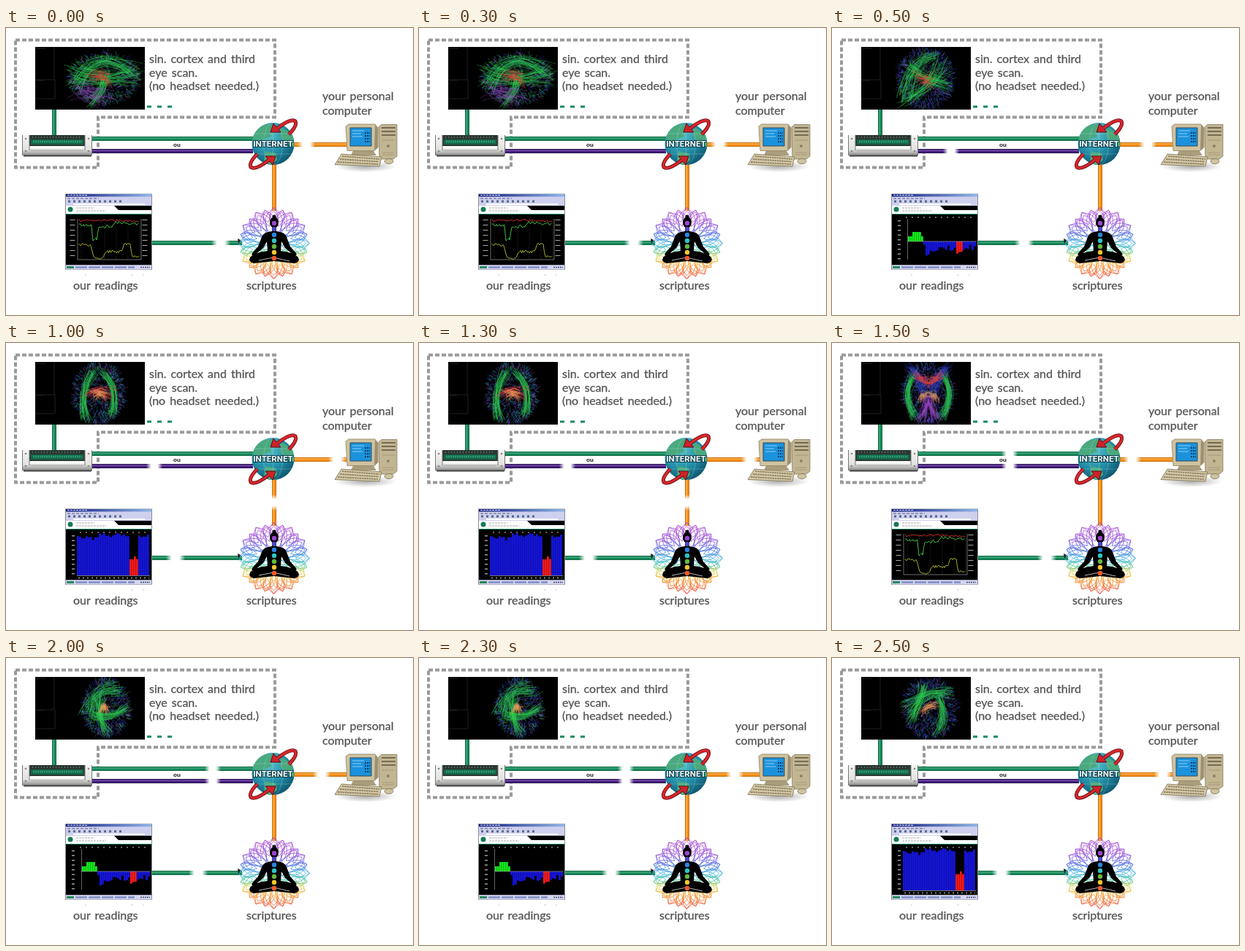
These frames come from a looping animation (557x394 px, 3 s). An HTML page:

```html
<!DOCTYPE html>
<html lang="en">
<head>
<meta charset="utf-8">
<title>Scan network</title>
<style>
html, body { margin: 0; width: 100%; height: 100%; overflow: hidden; background: #fff; }
svg { display: block; width: 557px; height: 394px; }
.label { font: 16px Lato, "Open Sans", sans-serif; word-spacing: 2px; fill: #555; stroke: #555; stroke-width: .3; }
</style>
</head>
<body>
<svg id="stage" viewBox="0 0 557 394" xmlns="http://www.w3.org/2000/svg">
<defs>
  <linearGradient id="fadeX"><stop offset="0" stop-color="#fff" stop-opacity="0"/><stop offset=".3" stop-color="#fff"/><stop offset=".7" stop-color="#fff"/><stop offset="1" stop-color="#fff" stop-opacity="0"/></linearGradient>
  <linearGradient id="fadeY" x2="0" y2="1"><stop offset="0" stop-color="#fff" stop-opacity="0"/><stop offset=".3" stop-color="#fff"/><stop offset=".7" stop-color="#fff"/><stop offset="1" stop-color="#fff" stop-opacity="0"/></linearGradient>
  <linearGradient id="petal" gradientUnits="userSpaceOnUse" x1="0" y1="-49" x2="0" y2="49">
    <stop offset="0" stop-color="#b04fcf"/><stop offset=".22" stop-color="#9a52d8"/><stop offset=".36" stop-color="#5568e0"/><stop offset=".5" stop-color="#36aee0"/><stop offset=".6" stop-color="#4cc8a0"/><stop offset=".7" stop-color="#e8cf3a"/><stop offset=".8" stop-color="#f59a2c"/><stop offset="1" stop-color="#ec3c34"/>
  </linearGradient>
  <radialGradient id="sea" cx=".38" cy=".3" r=".75"><stop offset="0" stop-color="#5cc3c8"/><stop offset=".55" stop-color="#2390aa"/><stop offset="1" stop-color="#0d536c"/></radialGradient>
  <radialGradient id="shade"><stop offset="0" stop-color="#888" stop-opacity=".7"/><stop offset="1" stop-color="#888" stop-opacity="0"/></radialGradient>
  <linearGradient id="metal" x2="0" y2="1"><stop offset="0" stop-color="#f4f4f2"/><stop offset=".7" stop-color="#e2e2e0"/><stop offset="1" stop-color="#888"/></linearGradient>
  <linearGradient id="title"><stop offset="0" stop-color="#101a80"/><stop offset="1" stop-color="#8eb6e8"/></linearGradient>
  <clipPath id="scanBox"><rect x="40" y="26" width="150" height="86"/></clipPath>
  <clipPath id="ball"><circle cx="365.500" cy="159" r="29"/></clipPath>
</defs>
<rect width="557" height="394" fill="#fff"/>
<path d="M13 16.500H368V122.500H126V191.500H13Z" fill="none" stroke="#9a9a9a" stroke-width="4" stroke-dasharray="6 3"/>
<g id="cables"></g>
<text x="229" y="163" font-family="Liberation Sans, Arial, sans-serif" font-size="8" font-weight="700" fill="#111">ou</text>
<g id="gaps"></g>

<rect x="40" y="26" width="150" height="86"/>
<path d="M40 71H67V97H40M66 26V71M42 28H54M42 72H52" fill="none" stroke="#2b2f33" stroke-width=".7"/>
<g id="scans" clip-path="url(#scanBox)" fill="none"></g>
<path d="M193 108H199M207 108H213M221 108H227" stroke="#168a5c" stroke-width="3"/>

<g id="device">
  <rect x="22.500" y="147" width="95" height="28" rx="1" fill="url(#metal)"/>
  <path d="M24 175.500H117" stroke="#444" stroke-width="2"/>
  <rect x="32" y="147" width="76" height="15" fill="#2a3631"/>
  <path d="M36 150H104" stroke="#6c7771" stroke-width="2" stroke-dasharray="1 3"/>
  <rect x="34" y="153" width="72" height="7" fill="#14664a"/>
  <path d="M37 156H104" stroke="#2f9a70" stroke-width="3" stroke-dasharray="2 1"/>
  <path d="M32 164H108" stroke="#fff" stroke-width="3"/>
  <path d="M34 168.500H106" stroke="#bdbdbb" stroke-width="3"/>
  <path d="M22.500 147V175M117.500 147V175M32 147V168M108 147V168" stroke="#777"/>
  <g fill="#888"><circle cx="27" cy="152" r="1.300"/><circle cx="27" cy="169" r="1.300"/><circle cx="113" cy="152" r="1.300"/><circle cx="113" cy="169" r="1.300"/></g>
</g>

<g id="globe">
  <circle cx="365.500" cy="159" r="29" fill="url(#sea)"/>
  <g clip-path="url(#ball)">
    <path d="M338 148Q346 131 362 132L370 139 361 144 363 149 352 153 346 163 339 160ZM355 169L369 172 371 181 361 190 353 182ZM377 136L394 147V163L383 158 375 149Z" fill="#4aa97e"/>
    <g fill="none" stroke="#b4e7e4" stroke-width=".6" opacity=".5"><ellipse cx="365.500" cy="159" rx="13" ry="29"/><path d="M336 145H395M336 173H395M365.500 130V188"/></g>
  </g>
  <g id="swoosh" stroke-linejoin="round">
    <path d="M387 146Q399 134 396 128Q390 123 371 138" fill="none" stroke="#5c0d12" stroke-width="5"/>
    <path d="M362 143L366 131 376 143Z" fill="#cf2229" stroke="#5c0d12"/>
    <path d="M387 146Q399 134 396 128Q390 123 371 138" fill="none" stroke="#d9262d" stroke-width="3.400"/>
  </g>
  <use href="#swoosh" transform="rotate(180 365.500 159.500)"/>
  <text x="365.500" y="163" text-anchor="middle" font-family="Roboto, Arial, sans-serif" font-size="11.600" font-weight="700" fill="#fff" stroke="#073c4c" stroke-width="2" paint-order="stroke">INTERNET</text>
</g>

<g id="computer" stroke-linejoin="round">
  <ellipse cx="492" cy="190" rx="42" ry="8" fill="url(#shade)"/>
  <path d="M510 136L514 132.500H535V176L530 180H511Z" fill="#c2b592" stroke="#877b5f" stroke-width=".8"/>
  <path d="M514 137H533M514 142H533M514 147H533" stroke="#766c54" stroke-width="2"/>
  <path d="M515 154H532M515 171H531M515 174H531" stroke="#a7997a"/>
  <circle cx="523" cy="162" r="2" fill="#8c8064"/>
  <path d="M476 166H501L507 175H472Z" fill="#aa9d7c"/>
  <path d="M465 135L469 132H505L509 137V164L504 168.500H467Z" fill="#cfc3a0" stroke="#8d8265" stroke-width=".8"/>
  <path d="M505 133L509 137V164L504 168Z" fill="#9d9172"/>
  <path d="M471 137H500V162H471Z" fill="#1b92dc" stroke="#344b55"/>
  <path d="M474 141H490M474 145H486M474 149H488" stroke="#8ed1f4"/>
  <path d="M491 144H498M491 148H498M491 152H498M491 156H498" stroke="#0c426f" stroke-width="2" stroke-dasharray="2 1"/>
  <path d="M459 173L514 177 511 190 450 187.500Z" fill="#d3c7a4" stroke="#7e7358" stroke-width=".8"/>
  <path d="M460 176L511 180M457 180L510 183.500M454 184L509 187" stroke="#857a60" stroke-width="1.600" stroke-dasharray="2.500 .8"/>
  <ellipse cx="524" cy="183" rx="6" ry="3.500" fill="#cfc3a0" stroke="#7e7358" stroke-width=".8"/>
</g>

<g id="window">
  <rect x="81.500" y="228" width="118" height="103.500" fill="#cfd0ee" stroke="#72777c" stroke-width=".8"/>
  <rect x="82" y="228" width="117" height="3.500" fill="url(#title)"/>
  <path d="M84 229.500H112" stroke="#dce7ff" stroke-dasharray="3 1"/>
  <path d="M84 234H127" stroke="#555a80" stroke-dasharray="4 2"/>
  <path d="M85 238H158" stroke="#53688b" stroke-width="3" stroke-dasharray="3 4"/>
  <path d="M92 242H190" stroke="#fff" stroke-width="2"/>
  <rect x="82" y="244" width="117" height="12" fill="#fff"/>
  <path d="M148 244H199V250H154Z"/>
  <circle cx="88" cy="249" r="3.500" fill="#147a55"/>
  <path d="M96 247H121M96 251H137" stroke="#aaa" stroke-dasharray="3 1"/>
  <path d="M82 255.500H199" stroke="#2a8a72"/>
  <rect x="82" y="256" width="117" height="69.500"/>
  <g id="charts"></g>
  <rect x="82" y="325.500" width="117" height="6" fill="#d6d6f2"/>
  <path d="M83 328.500H93" stroke="#27895c" stroke-width="3"/>
  <path d="M95 328.500H176" stroke="#7d8cc4" stroke-width="2.500" stroke-dasharray="16 2"/>
  <path d="M184 328.500H197" stroke="#3e4860" stroke-width="1.500" stroke-dasharray="2 1"/>
</g>
<path d="M108 339H110M171 339H174M187 339H189" stroke="#ccc"/>

<g id="mandala" transform="translate(366.500 295.500)" fill="none" stroke="url(#petal)" stroke-width=".8"></g>
<g id="yogi">
  <circle cx="367" cy="259" r="2.600"/>
  <ellipse cx="367" cy="267" rx="6" ry="7.500"/>
  <path d="M364 272H370V279Q382 280 384 287L389 300 397 309Q399 313 394 312L382 302 377 293 376 306Q394 308 400 315Q403 321 395 323L367 320 339 323Q331 321 334 315Q340 308 358 306L357 293 352 302 340 312Q335 313 337 309L345 300 350 287Q352 280 364 279Z"/>
  <path d="M346 319L366 315 388 320" fill="none" stroke="#fff" stroke-width=".7"/>
</g>
<path d="M317 289L321 291 318 297Z" fill="#222"/>

<g class="label">
  <text x="196" y="48">sin. cortex and third</text>
  <text x="196" y="67">eye scan.</text>
  <text x="196" y="85">(no headset needed.)</text>
  <text x="433" y="99">your personal</text>
  <text x="433" y="119">computer</text>
  <text x="92" y="359">our readings</text>
  <text x="329" y="359">scriptures</text>
</g>
</svg>
<script>
const $ = id => document.getElementById(id);
const STEP = 500, COUNT = 6;

function add(parent, tag, attrs) {
  const el = document.createElementNS("http://www.w3.org/2000/svg", tag);
  for (const key in attrs) el.setAttribute(key, attrs[key]);
  return parent.appendChild(el);
}

function random(seed) {
  return () => (seed = (seed * 16807) % 2147483647) / 2147483647;
}

// Cables: dark edge, body and a thin highlight
function cable(d, [dark, body, light], dx = 0, dy = -1) {
  const g = $("cables");
  add(g, "path", { d, stroke: dark, "stroke-width": 6 });
  add(g, "path", { d, stroke: body, "stroke-width": 4 });
  add(g, "path", { d, stroke: light, "stroke-width": 1, transform: `translate(${dx} ${dy})` });
}
const green = ["#0f6844", "#16885a", "#58b78c"];
const orange = ["#c8700f", "#f58c13", "#ffc064"];
const purple = ["#21104c", "#482080", "#8061ad"];
cable("M66 112V148", green, -1, 0);
cable("M118 152H338", green);
cable("M118 169H338", purple);
cable("M393 160H466", orange);
cable("M367 187V251", orange, -1, 0);
cable("M200 295H323", green);

// Gaps in the cables travel with the signal; each is placed by its centre
function pulse(axis, cross, length, at) {
  const across = axis === "x", thick = 10;
  const el = add($("gaps"), "rect", {
    width: across ? length : thick, height: across ? thick : length,
    [across ? "y" : "x"]: cross - thick / 2, fill: `url(#fade${axis.toUpperCase()})`
  });
  return n => {
    const pos = at(n);
    el.setAttribute("display", pos === null ? "none" : "inline");
    if (pos !== null) el.setAttribute(axis, pos - length / 2);
  };
}
const link = n => 123 + 40 * n;
const pulses = [
  pulse("x", 152, 22, n => n > 2 && n < 5 ? link(n) : null),
  pulse("x", 169, 22, n => n > 0 && n < 5 ? link(n) : null),
  pulse("x", 160, 24, n => 411 + 21 * (n % 3)),
  pulse("y", 367, 22, n => n === 2 ? 219 : null),
  pulse("x", 295, 26, n => 294 - 31 * (n % 3))
];

// Scan views: centre, radii, haze hues, then bundles [colour, start, bend, end, spread]
const G = "#2fd052", B = "#3448e0", R = "#e8453b", P = "#9a48c4", O = "#f0a060", C = "#2f9aa8";
const views = [
  { box: [134, 69, 49, 36], haze: [B, G, C, P], bundles: [
    [G, -43, 10, -10, -48, 38, -8, 10], [G, -34, -6, 0, 8, 42, -6, 14],
    [G, 0, -4, 0, 18, -16, 32, 8], [R, -16, -2, -4, -10, 6, 4, 9], [P, -32, 16, -20, 23, 0, 27, 12]] },
  { box: [128, 69, 39, 42], haze: [B, P, C, B], bundles: [
    [G, -28, 24, -18, -22, 12, -32, 9], [G, -25, 28, 8, 16, 22, -20, 11],
    [G, -24, -12, 0, 2, 29, 8, 9], [R, -8, -4, 0, 8, 6, 4, 11]] },
  { box: [127, 69, 36, 42], haze: [B, C, P, C], bundles: [
    [G, -8, -30, -28, 0, -18, 34, 6], [G, 6, -30, 28, -6, 17, 30, 6],
    [R, -12, 4, 0, -10, 14, 3, 9], [O, -8, 2, 0, -4, 8, 4, 7]] },
  { box: [132, 68, 36, 42], haze: [B, C, B, P], mirror: true, bundles: [
    [G, 18, -25, 38, 2, 18, 32, 6], [B, 5, 0, 12, -28, 26, -34, 8],
    [R, 0, -14, 10, -20, 16, -24, 6], [O, 2, 4, 8, 0, 11, 8, 5], [P, 2, 10, 6, 24, 10, 36, 6]] },
  { box: [137, 68, 33, 41], haze: [P, B, G, B], bundles: [
    [G, -26, 10, -20, -30, 16, -28, 9], [G, -8, -14, -14, 12, 2, 34, 6],
    [G, -20, 8, 8, 18, 27, -2, 7], [O, -6, 4, -2, -10, 0, 5, 5]] },
  { box: [134, 69, 38, 41], haze: [B, P, C, B], bundles: [
    [G, -30, 2, -2, -26, 24, -20, 9], [G, -26, 17, -12, -10, -8, -31, 6],
    [G, 12, -16, 24, 8, 10, 30, 7], [O, -8, 4, -2, -6, 8, -4, 6]] }
];

function drawView({ box: [cx, cy, rx, ry], haze, mirror, bundles }, index) {
  const rnd = random(7001 + index * 913);
  const g = add($("scans"), "g", { transform: `translate(${cx} ${cy})`, "stroke-width": .6 });
  const off = size => (rnd() + rnd() - 1) * size;
  for (const stroke of haze) {
    let d = "";
    for (let i = 0; i < 270; i++) {
      const a = rnd() * Math.PI * 2, r = Math.sqrt(rnd()) * .95;
      const x = Math.cos(a) * rx * r, y = Math.sin(a) * ry * r;
      d += `M${x.toFixed(1)} ${y.toFixed(1)}l${(x * .1 + off(5)).toFixed(1)} ${(y * .1 + off(5)).toFixed(1)}`;
    }
    add(g, "path", { d, stroke, opacity: .6 });
  }
  for (const [stroke, ...nums] of bundles) {
    const spread = nums.pop() * 1.6;
    let d = "";
    for (let i = 0; i < 28; i++) {
      const p = nums.map(v => (v + off(spread)).toFixed(1));
      d += `M${p[0]} ${p[1]}Q${p[2]} ${p[3]} ${p[4]} ${p[5]}`;
    }
    const style = { d, stroke, opacity: .6 };
    add(g, "path", style);
    if (mirror) add(g, "path", { ...style, transform: "scale(-1 1)" });
  }
  return g;
}
const scans = views.map(drawView);

// Three chart types
function bar(g, x, y, h, fill) {
  add(g, "rect", { x, y, width: 2.8, height: h, fill });
}
function ticks(g) {
  add(g, "path", { d: "M92 264V318", stroke: "#999", "stroke-width": 4, "stroke-dasharray": "1.5 5" });
  add(g, "path", { d: "M101 260H196", stroke: "#888", "stroke-width": 1.5, "stroke-dasharray": "2 6" });
}
function lineChart(g) {
  const rnd = random(311);
  const trace = (points, stroke, jitter) => {
    let d = "";
    for (let i = 1; i < points.length; i++) {
      const [x0, y0] = points[i - 1], [x1, y1] = points[i];
      for (let x = x0; x < x1; x += 1.5)
        d += `${d ? "L" : "M"}${x} ${(y0 + (y1 - y0) * (x - x0) / (x1 - x0) + (rnd() - .5) * jitter).toFixed(1)}`;
    }
    add(g, "path", { d, stroke, "stroke-width": .9 });
  };
  for (let x = 103; x < 186; x += 16)
    add(g, "path", { d: `M${x} 262V318`, stroke: "#555", "stroke-width": .6, "stroke-dasharray": "1 2" });
  add(g, "path", { d: "M98 262V318H185V262", stroke: "#999", "stroke-width": .7 });
  add(g, "path", { d: "M91 263V318M190 263V318", stroke: "#aaa", "stroke-width": 7, "stroke-dasharray": "1 6" });
  trace([[100, 264], [140, 264], [183, 265]], "#df3232", 3);
  trace([[100, 270], [117, 271], [119, 291], [124, 290], [127, 273], [145, 272], [150, 267], [183, 270]], "#45cf4b", 4);
  trace([[100, 297], [116, 298], [120, 314], [132, 316], [136, 307], [158, 307], [162, 296], [170, 298], [173, 314], [183, 313]], "#b8bf31", 4);
}
const isRed = x => x > 167 && x < 179;
function signedBars(g) {
  const rnd = random(83);
  ticks(g);
  for (let x = 104; x < 196; x += 3) {
    const up = x < 125, red = isRed(x);
    const h = up ? (x > 109 && x < 122 ? 13 : 7) : 5 + rnd() * 8 + (x > 127 && x < 142 ? 7 : red ? 4 : 0);
    bar(g, x, up ? 293 - h : 293, h, up ? "#13e51b" : red ? "#ee1c1c" : "#1414d6");
  }
  add(g, "path", { d: "M103.500 262V318M103 293H197", stroke: "#aaa", "stroke-width": .6 });
}
function tallBars(g) {
  const rnd = random(47);
  ticks(g);
  for (let x = 97; x < 196; x += 3) {
    const red = isRed(x);
    const y = red ? 290 + rnd() * 9 : 261 + rnd() * 6 + (x < 121 ? 4 : 0);
    bar(g, x, y, 319 - y, red ? "#f01919" : "#1414d6");
  }
  add(g, "path", { d: "M97 319.500H197", stroke: "#aaa", "stroke-width": .7 });
  add(g, "path", { d: "M99 322.500H196", stroke: "#888", "stroke-width": 2, "stroke-dasharray": "2 4" });
}
const charts = [lineChart, signedBars, tallBars].map(draw => {
  const g = add($("charts"), "g", { fill: "none" });
  draw(g);
  return g;
});

// Petal lattice and the seven centres
function petals(count, inner, outer, half, turn = 0) {
  const mid = inner + (outer - inner) * .55;
  for (let i = 0; i < count; i++) {
    const a = (i + turn) * Math.PI * 2 / count;
    const pt = (r, s) => `${(Math.sin(a) * r + Math.cos(a) * s).toFixed(1)} ${(-Math.cos(a) * r + Math.sin(a) * s).toFixed(1)}`;
    add($("mandala"), "path", { d: `M${pt(inner, 0)}Q${pt(mid, half)} ${pt(outer, 0)}Q${pt(mid, -half)} ${pt(inner, 0)}` });
  }
}
petals(12, 8, 49, 24);
petals(12, 12, 47, 20, .5);
petals(12, 20, 49, 12);
petals(12, 24, 47, 10, .5);
petals(24, 30, 44, 9);
["#9b45d1", "#4e45bd", "#2d82df", "#2fc4c4", "#62bd3c", "#f2c72f", "#ed572e"].forEach((fill, i) =>
  add($("yogi"), "circle", { cx: 367, cy: 268 + i * 8, r: 3.2, fill }));

const show = (list, n) => list.forEach((el, i) => el.setAttribute("display", i === n ? "inline" : "none"));

function render(time) {
  const n = Math.floor(time / STEP) % COUNT;
  show(scans, n);
  show(charts, n % 3);
  pulses.forEach(move => move(n));
}

const start = performance.now();
function tick(now) {
  render(Math.max(0, now - start));
  requestAnimationFrame(tick);
}
render(0);
requestAnimationFrame(tick);
</script>
</body>
</html>
```
